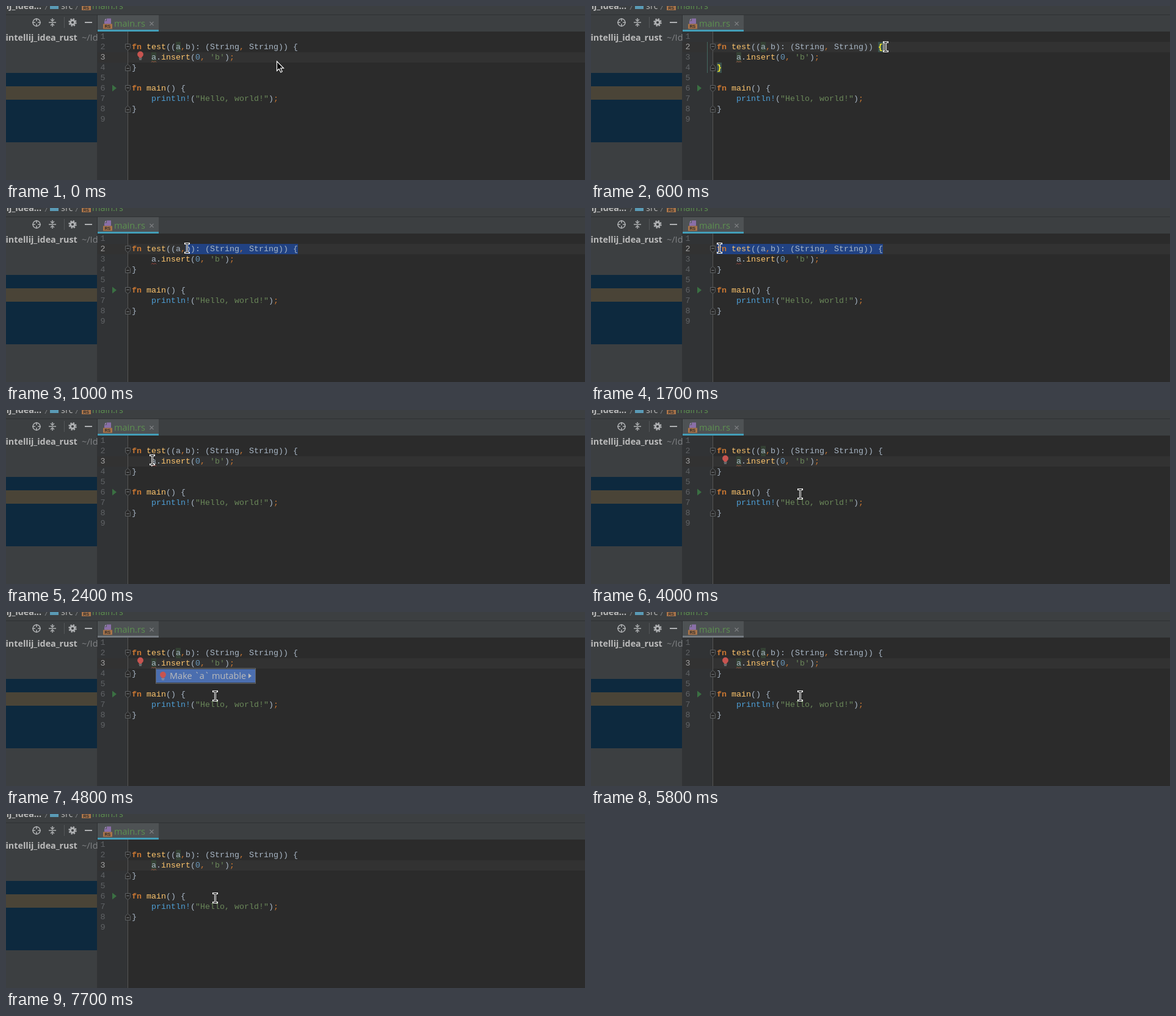
Write an HTML page that moves like this. It is 948 px wide and 286 px high and loops after 8 s.

```html
<!DOCTYPE html>
<html lang="en">
<head>
<meta charset="utf-8">
<title>Rust editor</title>
<style>
html, body { margin: 0; width: 100%; height: 100%; overflow: hidden; background: #2b2b2b; }
svg { display: block; width: 948px; height: 286px; }
text { white-space: pre; }
.ui { font: 14.5px "Open Sans", sans-serif; fill: #bbb; }
.bold { font-weight: 700; font-size: 14.3px; }
.ui.file { fill: #5d9150; }
.code { font: 13.333px "Liberation Mono", monospace; fill: #a9b7c6; }
.badge { font: bold 7px "Liberation Sans", sans-serif; fill: #2b2b2b; }
.k { fill: #cc7832; font-weight: 700; }
.p { fill: #cc7832; }
.f { fill: #ffc66d; }
.s { fill: #6a8759; }
.n { fill: #6897bb; }
.m { fill: #4e9fd6; }
.match { fill: #ffef28; font-weight: 700; }
.icon { fill: none; stroke: #afb1b3; stroke-width: 1.5; }
</style>
</head>
<body>
<svg viewBox="0 0 948 286">
  <defs>
    <g id="rustFile">
      <path d="M6 0H13V9H2V4H6Z" fill="#8a6fa8"/>
      <path d="M2 3L5 0V3Z" fill="#a68fbd"/>
      <rect y="9" width="15" height="8" fill="#a9744a"/>
      <text class="badge" x="2.5" y="15.6">RS</text>
    </g>
    <g id="bulbShape">
      <circle r="4.9" fill="#c75450"/>
      <path d="M-3 3H3L2 5.5H-2Z" fill="#c75450"/>
      <path d="M-2.5 6.5H2.5M-2 8.5H2" stroke="#9a9da0"/>
    </g>
    <g id="foldStart">
      <path d="M-4-5H4V2L0 5.5L-4 2Z" fill="#2b2b2b" stroke="#5d6062"/>
      <path d="M-2-1H2" stroke="#7d8083"/>
    </g>
    <g id="foldEnd">
      <path d="M-4 5H4V-2L0-5.5L-4-2Z" fill="#2b2b2b" stroke="#5d6062"/>
      <path d="M-2 1H2" stroke="#7d8083"/>
    </g>
    <path id="beamShape" d="M-3-7H3M0-7V8M-3 8H3" fill="none"/>
  </defs>

  <!-- editor -->
  <rect x="149" y="42" width="50" height="244" fill="#313335"/>
  <rect id="row" x="150" width="798" height="17" fill="#323232"/>
  <path d="M199.5 42V286" stroke="#555"/>
  <g id="usages" fill="#344134">
    <rect x="278" y="59" width="8" height="17"/>
    <rect x="238" y="76" width="8" height="17"/>
  </g>
  <g id="braces">
    <path d="M470 59h8v17h-8zM206 93h8v17h-8z" fill="#3b514d"/>
    <path d="M190.5 59V110" stroke="#43675f"/>
  </g>
  <rect id="selection" y="59" height="17" fill="#214283"/>
  <use href="#foldStart" x="199.5" y="67.5"/>
  <use href="#foldEnd" x="199.5" y="101.5"/>
  <use href="#foldStart" x="199.5" y="135.5"/>
  <use href="#foldEnd" x="199.5" y="169.5"/>
  <path d="M174 129.5L181 135L174 140.5Z" fill="#3a7042"/>
  <g id="numbers" class="code"></g>
  <g class="code">
    <text x="206" y="71"><tspan class="k">fn</tspan> <tspan class="f">test</tspan>((a<tspan class="p">,</tspan>b): (String<tspan class="p">,</tspan> String)) <tspan class="brace">{</tspan></text>
    <text x="238" y="88">a.<tspan class="f">insert</tspan>(<tspan class="n">0</tspan><tspan class="p">,</tspan> <tspan class="s">'b'</tspan>)<tspan class="p">;</tspan></text>
    <text x="206" y="105" class="brace">}</text>
    <text x="206" y="139"><tspan class="k">fn</tspan> <tspan class="f">main</tspan>() {</text>
    <text x="238" y="156"><tspan class="m">println!</tspan>(<tspan class="s">"Hello, world!"</tspan>)<tspan class="p">;</tspan></text>
    <text x="206" y="173">}</text>
  </g>
  <path d="M238 92.5l2-2l2 2l2-2l2 2" fill="none" stroke="#a5483f"/>
  <use id="bulb" href="#bulbShape" x="220" y="79.5"/>
  <rect id="caret" width="1.5" height="17" fill="#bbb"/>

  <!-- project panel -->
  <rect width="149" height="286" fill="#3c3f41"/>
  <rect y="110" width="149" height="114" fill="#0d293e"/>
  <rect y="132" width="149" height="22" fill="#4a4437"/>
  <text class="ui bold" x="-0.5" y="57">intellij_idea_rust</text>
  <text class="ui" x="124" y="57" style="fill:#808285">~/Id</text>

  <!-- bars and tab -->
  <rect width="948" height="42" fill="#3c3f41"/>
  <rect x="150" y="15" width="100" height="27" fill="#4e5254"/>
  <rect id="underline" x="150" y="39" width="100" height="3"/>
  <path d="M0 14.5H948M149.5 15V42" stroke="#2f3133"/>
  <use href="#rustFile" x="159" y="20.5"/>
  <text class="ui file" x="177" y="34">main.rs</text>
  <path d="M235.5 26l6 6m0-6l-6 6" stroke="#7b7e80" stroke-width="1.2"/>

  <text class="ui bold" x="58" y="5" text-anchor="end">intellij_idea...</text>
  <path d="M64 6L69-4M114 6L119-4" stroke="#808285"/>
  <path d="M72-6H78L80-4H86V5H72Z" fill="#5a9ab5"/>
  <text class="ui" x="90" y="5">src</text>
  <use href="#rustFile" x="124" y="-10"/>
  <text class="ui file" x="141" y="5">main.rs</text>

  <g class="icon">
    <circle cx="50" cy="27" r="6"/>
    <path d="M50 20v5M50 29v5M43 27h5M52 27h5M70 27h12M76 20v4M76 34v-4"/>
    <path d="M73 22l3 3l3-3M73 32l3-3l3 3" stroke-width="1.3"/>
    <path d="M95.5 18V36" stroke="#555759" stroke-width="1"/>
    <circle cx="109" cy="27" r="3.5" stroke-width="2.8"/>
    <circle cx="109" cy="27" r="5.6" stroke-width="2.2" stroke-dasharray="2.4 2"/>
    <path d="M129 27h12" stroke-width="2"/>
  </g>

  <g id="popup">
    <rect x="245.5" y="92.5" width="163" height="25" fill="#3c3f41" stroke="#616365"/>
    <rect x="246" y="94" width="162" height="22" fill="#4b6eaf"/>
    <use href="#bulbShape" x="257" y="103"/>
    <text class="ui" x="268" y="110">Make `a` mutable</text>
    <path d="M397 101L402 105L397 109Z" fill="#bbb"/>
  </g>

  <path id="arrow" d="M443.5 91V106.5L447 103.2L449.8 109L452.2 107.8L449.6 102.2H454.5Z" fill="#000" stroke="#fff" stroke-width="1.2"/>
  <g id="beam">
    <use href="#beamShape" stroke="#fff" stroke-width="3" stroke-linecap="square"/>
    <use href="#beamShape" stroke="#000"/>
  </g>
</svg>
<script>
const LOOP = 8000, STEP = 100, CHAR = 8, LEFT = 206, LINE_END = 478;
const $ = id => document.getElementById(id);
const show = (id, on) => { $(id).style.display = on ? '' : 'none'; };
const rowTop = line => 42 + 17 * (line - 1);

for (let n = 1; n <= 9; n++)
  $('numbers').innerHTML += `<text x="154.5" y="${rowTop(n) + 12}">${n}</text>`;

// time, x, y of the mouse
const path = [
  [0, 443, 91], [100, 452, 86], [400, 482, 67], [700, 482, 67], [900, 318, 66],
  [1000, 296, 66], [1500, 215, 66], [1700, 210, 66], [1900, 239, 81],
  [2500, 239, 82], [2800, 335, 144], [3000, 342, 138], [LOOP, 342, 138]
];

function mouseAt(t) {
  const i = path.findIndex(key => key[0] > t);
  const [t0, x0, y0] = path[i - 1], [t1, x1, y1] = path[i];
  const k = (t - t0) / (t1 - t0);
  return [x0 + (x1 - x0) * k, y0 + (y1 - y0) * k];
}

function draw(now) {
  const t = Math.floor(now % LOOP / STEP) * STEP;
  const during = (from, to) => t >= from && t < to;
  const [x, y] = mouseAt(t);

  show('arrow', t < 100);
  show('beam', t >= 100);
  $('beam').setAttribute('transform', `translate(${Math.round(x) + 0.5} ${Math.round(y) - 0.5})`);

  const line = during(500, 2200) ? 2 : 3;
  $('row').setAttribute('y', rowTop(line));
  [...$('numbers').children].forEach((el, i) => {
    el.style.fill = i + 1 === line ? '#a4a3a3' : '#606366';
  });

  const start = t >= 1700 ? LEFT : LEFT + CHAR * Math.floor((x - LEFT) / CHAR);
  show('selection', during(800, 2200));
  $('selection').setAttribute('x', start);
  $('selection').setAttribute('width', Math.max(0, LINE_END - start));

  const matched = during(500, 800);
  show('braces', matched);
  document.querySelectorAll('.brace').forEach(el => el.classList.toggle('match', matched));

  show('usages', t < 800 || t >= 2800);
  show('bulb', t < 500 || during(3200, 4200) || during(4600, 5900));
  show('popup', during(4800, 5800));
  $('underline').setAttribute('fill', during(4600, 5900) ? '#747a80' : '#439eb8');

  const caretX = matched ? LINE_END : t < 4000 ? 238 : 245.5;
  show('caret', matched || during(2200, 4000) || during(4200, 4600) ||
    during(5900, 6300) || during(7000, 7700));
  $('caret').setAttribute('x', caretX);
  $('caret').setAttribute('y', rowTop(line));
}

function tick() {
  draw(performance.now());
  requestAnimationFrame(tick);
}
tick();
</script>
</body>
</html>
```
